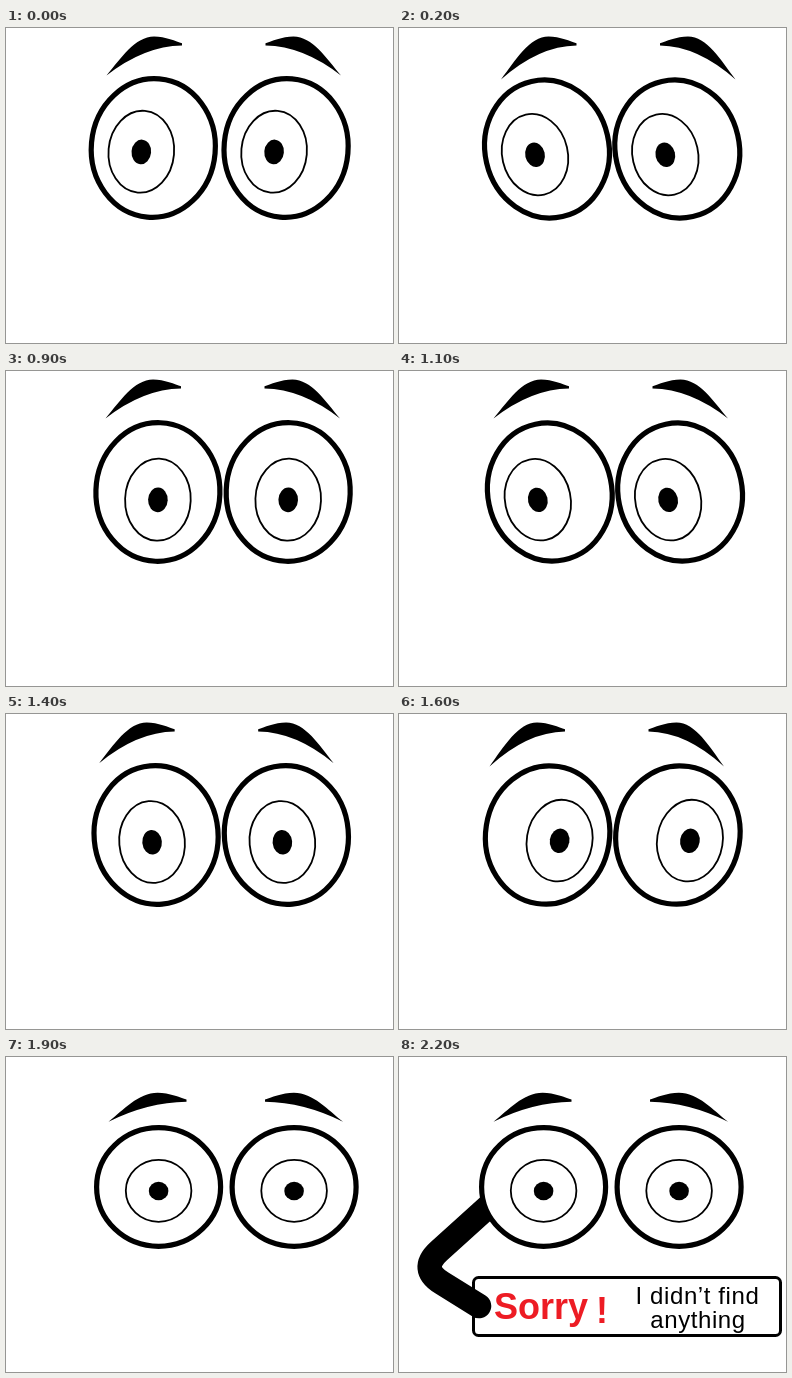
These frames come from a looping animation (387x315 px, 4.6 s). An HTML page with a canvas:

```html
<!DOCTYPE html>
<html lang="en">
<head>
<meta charset="utf-8">
<style>
  html, body { margin: 0; width: 100%; height: 100%; overflow: hidden; background: #fff; }
  canvas { display: block; }
</style>
</head>
<body>
<canvas id="stage" width="387" height="315"></canvas>
<script>
const ctx = document.getElementById('stage').getContext('2d');
const LOOP = 4600, STEP = 100, SIGN_TIME = 2100;

// x, y: centre of the left eye; gap: distance to the right eye;
// lookX, lookY: iris offset; brow: inner end of the left brow; drop: height of the brows
const rest = {
  x: 147.3, y: 120, gap: 132.8, tilt: 5, lookX: -12, lookY: 3.7,
  brow: 176, drop: 31, squash: 0
};

// Each move changes only the values it names.
const moves = [
  { start: 0, end: 200, to: { x: 148, y: 121, gap: 130.3, tilt: -13, lookY: 5.6, brow: 177.5, drop: 35 } },
  { start: 200, end: 500, to: { x: 153, tilt: 16, lookX: 12, lookY: 7.7, brow: 180, drop: 31 } },
  { start: 700, end: 1100, to: { x: 150.8, tilt: -12, lookX: -12, brow: 170 } },
  { start: 1300, end: 1600, to: { x: 148.6, tilt: 9, lookX: 12, lookY: 5.6, brow: 166, drop: 36 } },
  { start: 1600, end: 1900, to: { x: 152.6, y: 130, gap: 135.5, tilt: 0, lookX: 0, lookY: 3.8,
    brow: 180.5, drop: 21, squash: 1 } },
  { start: 2000, end: 2200, to: { x: 144.6, brow: 172.5 } }
];

function poseAt(t) {
  const pose = { ...rest };
  for (const { start, end, to } of moves) {
    const k = Math.max(0, Math.min(1, (t - start) / (end - start)));
    for (const key in to) pose[key] += (to[key] - pose[key]) * k;
  }
  return pose;
}

function oval(x, y, rx, ry, tilt) {
  ctx.beginPath();
  ctx.ellipse(x, y, rx, ry, tilt * Math.PI / 180, 0, 2 * Math.PI);
}

function drawEye(x, { y, tilt, lookX, lookY, squash }) {
  oval(x, y, 62, 69.3 - 10 * squash, tilt);
  ctx.fillStyle = '#fff';
  ctx.fill();
  ctx.lineWidth = 5.2;
  ctx.stroke();
  const irisRy = 41 - 10 * squash;
  oval(x + lookX, y + lookY, 32.8, irisRy, tilt);
  ctx.lineWidth = 1.8;
  ctx.stroke();
  oval(x + lookX, y + lookY + 0.2, 9.8, irisRy * 0.3, tilt);
  ctx.fillStyle = '#000';
  ctx.fill();
}

// side is 1 for the left brow, -1 for its mirror image
function drawBrow(innerX, side, { drop, squash }) {
  const span = 75.5 + 2.5 * squash, peak = span * 0.37;
  ctx.save();
  ctx.translate(innerX, 16.5 + 27.3 * squash);
  ctx.scale(side, 1);
  ctx.beginPath();
  ctx.moveTo(-span, drop);
  ctx.bezierCurveTo(-span * 0.81, drop * 0.45, -span * 0.62, -8, -peak, -8);
  ctx.bezierCurveTo(-peak * 0.6, -8, -peak * 0.2, -3, 0, -1.3);
  ctx.lineTo(0, 1);
  ctx.quadraticCurveTo(-span / 2, 1.5, -span, drop);
  ctx.fillStyle = '#000';
  ctx.fill();
  ctx.restore();
}

function write(text, x, y, font, color, align = 'left', spacing = '0px') {
  ctx.font = `${font} "Liberation Sans", Arial, sans-serif`;
  ctx.fillStyle = color;
  ctx.textAlign = align;
  ctx.letterSpacing = spacing;
  ctx.fillText(text, x, y);
}

function drawSign() {
  ctx.beginPath();
  ctx.roundRect(74.5, 220.5, 307, 58, 5);
  ctx.lineWidth = 3;
  ctx.stroke();
  write('Sorry', 95, 262, 'bold 36px', '#ed1c24');
  write('!', 197, 266, 'bold 36px', '#ed1c24');
  write('I didn’t find', 298.5, 247, '24px', '#000', 'center', '0.6px');
  write('anything', 299, 270.5, '24px', '#000', 'center', '0.6px');
  ctx.lineWidth = 24.5;
  ctx.lineCap = 'round';
  ctx.stroke(new Path2D('M92 147L40 194Q20 212 43 226L80 249'));
}

function draw(now) {
  const t = Math.floor(now % LOOP / STEP) * STEP;
  const pose = poseAt(t);
  ctx.fillStyle = '#fff';
  ctx.fillRect(0, 0, 387, 315);
  ctx.strokeStyle = '#000';
  if (t >= SIGN_TIME) drawSign();
  drawEye(pose.x, pose);
  drawEye(pose.x + pose.gap, pose);
  drawBrow(pose.brow, 1, pose);
  drawBrow(pose.brow + 83.5 - 5 * pose.squash, -1, pose);
}

const began = performance.now();
function tick() {
  draw(performance.now() - began);
  requestAnimationFrame(tick);
}
tick();
</script>
</body>
</html>
```
